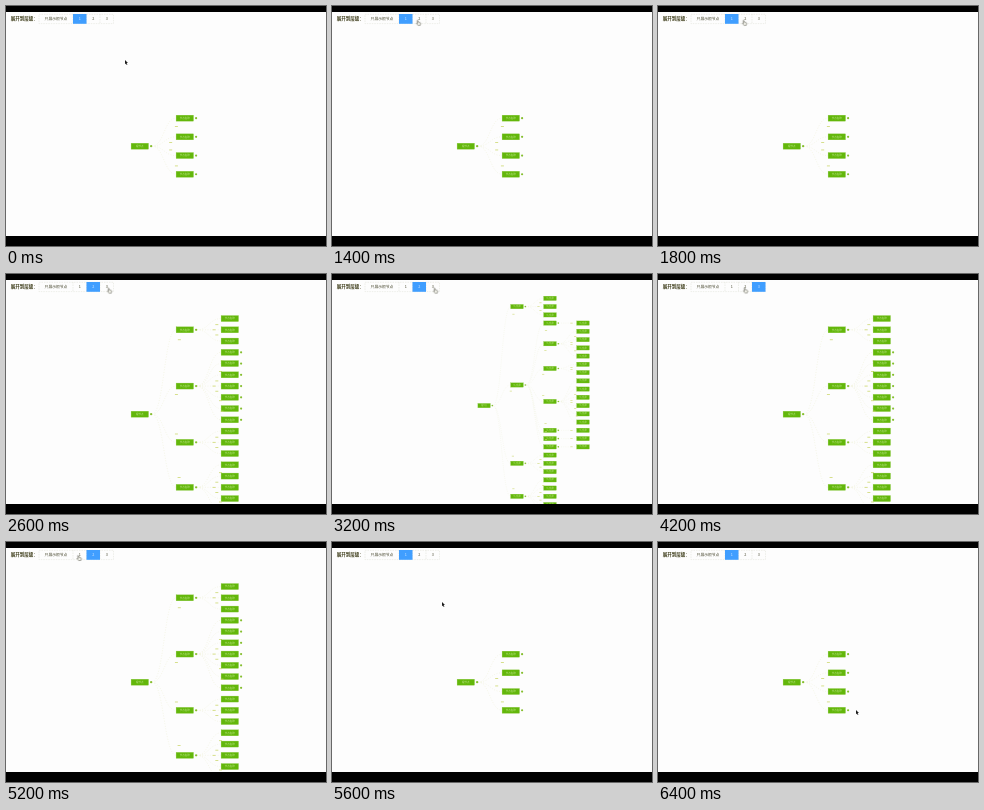
An HTML page that plays this animation: 320x240 px, repeating every 7 s.

```html
<!DOCTYPE html>
<html lang="zh">
<head>
<meta charset="utf-8">
<title>展开到层级</title>
<style>
  html, body { margin: 0; width: 100%; height: 100%; overflow: hidden; background: #000; }
  svg { display: block; width: 100%; height: 100%; }
  text { font-family: "Noto Sans CJK SC", "Noto Sans CJK", "Noto Sans", sans-serif; text-anchor: middle; }
  .title { font-size: 4.5px; font-weight: 700; fill: #3c3b18; text-anchor: start; }
  .tabs text { font-size: 3.8px; fill: #4c4c34; }
  .tabs path { fill: none; stroke: #e3e4dc; stroke-width: .6; stroke-dasharray: 1.5 1; }
  .node { fill: #63b70b; stroke: #8bc63f; stroke-width: .3; }
  .name { font-size: 2.5px; fill: #c6e79a; }
  .dot { fill: #86bf30; }
  .edge { fill: none; stroke: #eceed2; stroke-width: .5; stroke-dasharray: 1 1.6; }
  .mark { fill: #ccd870; }

  #active, #lit text, .tree, #pointer, #arrow, #hand { animation: 7s step-end infinite; }
  .tree { opacity: 0; }
  #active { fill: #409eff; animation-name: active; }
  #lit text { fill: #cfe6ff; font-size: 3.8px; opacity: 0; }
  #lit #lit0 { animation-name: lit0; }
  #lit #lit1 { animation-name: lit1; }
  #lit #lit2 { animation-name: lit2; }
  #lit #lit3 { animation-name: lit3; }
  #tree0 { animation-name: tree0; }
  #tree1 { animation-name: tree1; }
  #tree2 { animation-name: tree2; }
  #tree3 { animation-name: tree3; }
  #pointer { animation-name: move; }
  #arrow { animation-name: arrow; }
  #hand { animation-name: hand; }

  @keyframes tree0 { 0%, 14.28%, 100% { opacity: 0 } 8.57% { opacity: 1 } }
  @keyframes tree1 { 0%, 14.28%, 77.14%, 100% { opacity: 1 } 8.57%, 28.57% { opacity: 0 } }
  @keyframes tree2 { 0%, 45.71%, 77.14%, 100% { opacity: 0 } 28.57%, 60% { opacity: 1 } }
  @keyframes tree3 { 0%, 60%, 100% { opacity: 0 } 45.71% { opacity: 1 } }

  @keyframes active {
    0%, 17.14%, 80%, 100% { x: 67px; width: 13.5px }
    11.42% { x: 33px; width: 34px }
    31.42%, 62.85% { x: 80.5px; width: 13.5px }
    48.57% { x: 94px; width: 13.5px }
  }
  @keyframes lit0 { 0%, 17.14%, 100% { opacity: 0 } 11.42% { opacity: 1 } }
  @keyframes lit1 { 0%, 17.14%, 80%, 100% { opacity: 1 } 11.42%, 31.42% { opacity: 0 } }
  @keyframes lit2 { 0%, 48.57%, 80%, 100% { opacity: 0 } 31.42%, 62.85% { opacity: 1 } }
  @keyframes lit3 { 0%, 62.85%, 100% { opacity: 0 } 48.57% { opacity: 1 } }

  @keyframes move {
    0%, 100% { transform: translate(119px, 54px) }
    2.85% { transform: translate(96px, 38px) }
    5.71% { transform: translate(50px, 13px) }
    11.42% { transform: translate(70px, 13px) }
    20% { transform: translate(83.8px, 13.8px) }
    34.28% { transform: translate(94px, 13px) }
    37.14% { transform: translate(100.8px, 13.6px) }
    57.14% { transform: translate(84.8px, 13.4px) }
    71.42% { transform: translate(70.4px, 13px) }
    80% { transform: translate(110px, 60px) }
    82.85% { transform: translate(170px, 140px) }
    85.71% { transform: translate(198px, 168px) }
  }
  @keyframes arrow { 0%, 80%, 100% { opacity: 1 } 5.71% { opacity: 0 } }
  @keyframes hand { 0%, 80%, 100% { opacity: 0 } 5.71% { opacity: 1 } }
</style>
</head>
<body>
<svg viewBox="0 0 320 240" preserveAspectRatio="none">
  <rect y="6" width="320" height="224" fill="#fdfdfd"/>
  <g id="stage"></g>
  <g class="tabs">
    <path d="M33 8.3H107.5V17.6H33ZM67 8V18M80.5 8V18M94 8V18"/>
    <text x="50" y="14.3">只展示根节点</text>
    <text x="73.7" y="14.3">1</text>
    <text x="87.2" y="14.3">2</text>
    <text x="100.7" y="14.3">3</text>
  </g>
  <rect id="active" x="67" y="8" width="13.5" height="9.8"/>
  <g id="lit">
    <text id="lit0" x="50" y="14.3">只展示根节点</text>
    <text id="lit1" x="73.7" y="14.3">1</text>
    <text id="lit2" x="87.2" y="14.3">2</text>
    <text id="lit3" x="100.7" y="14.3">3</text>
  </g>
  <text class="title" x="4.8" y="14.2">展开到层级：</text>
  <rect y="230" width="320" height="10"/>
  <g id="pointer">
    <path id="arrow" d="M0 0V4.2L1 3.4L1.7 5L2.4 4.7L1.7 3.1H3Z" fill="#1c1c1c"/>
    <path id="hand" d="M1.2 .8Q1.8 0 2.3 .9L2.7 2.4L4.4 2.8Q5 3.2 4.8 4.3L4.4 5.5H2.3L.5 3.8Q.6 3 1.7 3.5Z"
      fill="#f4f4ec" stroke="#66665c" stroke-width=".6"/>
  </g>
</svg>
<script>
const GROUPS = [3, 7, 3, 5];
const INNER = [1, 4, 2, 6, 1, 1, 1];
const PITCH = 11.25, STEP = 45, W = 17.4, H = 6;

const branch = kids => ({ kids, name: '节点名称' });
const leaves = n => Array.from({ length: n }, () => branch([]));

function makeTree(depth) {
  const kids = GROUPS.map((n, i) => {
    const list = depth < 2 ? [] : leaves(n);
    if (i === 1) list.forEach((leaf, j) => {
      leaf.more = true;
      if (depth > 2) leaf.kids = leaves(INNER[j]);
    });
    return { ...branch(list), more: true };
  });
  return { kids: depth ? kids : [], name: '根节点', more: true };
}

// Leaves take successive rows; a parent sits midway over all the rows below it.
function layout(node, level, rows, pitch) {
  const first = rows.n;
  node.x = level * STEP;
  node.kids.forEach(k => layout(k, level + 1, rows, pitch));
  if (!node.kids.length) rows.n++;
  node.y = (first + rows.n - 1) / 2 * pitch;
}

function link(a, b) {
  const x1 = a.x + W / 2 + 3.5, x2 = b.x - W / 2, mid = (x1 + x2) / 2;
  const dy = b.y - a.y, u = Math.abs(dy);
  const mx = x2 + Math.max(-7, 5 - 160 / (u + 6));
  const my = b.y - Math.sign(dy) * 11 * u / (u + 9);
  return `<path class="edge" d="M${x1} ${a.y}C${mid} ${a.y} ${mid} ${b.y} ${x2} ${b.y}"/>
    <rect class="mark" x="${mx - 1.5}" y="${my - .4}" width="3" height=".8"/>`;
}

function draw(node) {
  const { x, y, kids, name, more } = node;
  return kids.map(k => link(node, k) + draw(k)).join('') +
    `<rect class="node" x="${x - W / 2}" y="${y - H / 2}" width="${W}" height="${H}"/>
     <text class="name" x="${x}" y="${y + .9}">${name}</text>` +
    (more ? `<circle class="dot" cx="${x + 11.3}" cy="${y}" r="1.1"/>` : '');
}

function treeMarkup(depth) {
  const root = makeTree(depth), deep = depth === 3;
  layout(root, 0, { n: 0 }, depth === 1 ? 18.7 : PITCH);
  const scale = deep ? .7333 : 1;
  const x = deep ? 152 : 133.8;
  const y = (deep ? 131.6 : 140.2) - root.y * scale;
  return `<g class="tree" id="tree${depth}"><g transform="translate(${x} ${y}) scale(${scale})">${draw(root)}</g></g>`;
}

document.getElementById('stage').innerHTML = [0, 1, 2, 3].map(treeMarkup).join('');
</script>
</body>
</html>
```
